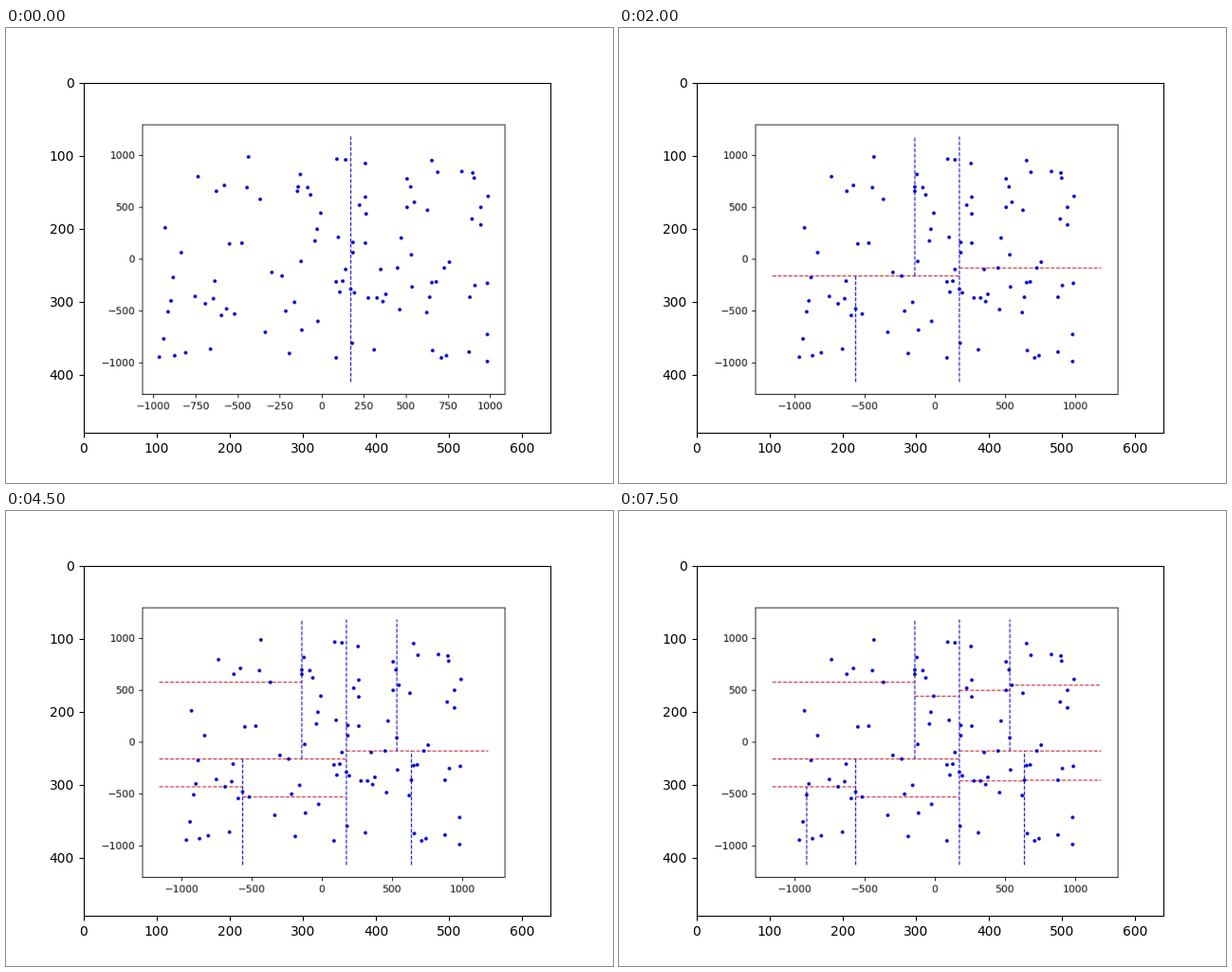
A matplotlib script for the animation above (8000 ms loop, 640 px wide and 480 px high).

```python
import random

import matplotlib.pyplot as plt
import numpy as np
from matplotlib.animation import FuncAnimation

STEP_MS = 500
DOT, VERT, HORZ = "mediumblue", "mediumblue", "#c01c28"

# median points of a k-d tree, breadth first; even levels cut x, odd levels cut y
MEDIANS = [
    (172, -293),
    (-238, -161), (449, -88),
    (-567, -478), (-144, 696), (637, -371), (531, 38),
    (-693, -434), (-519, -533), (-368, 573), (-8, 441),
    (276, -377), (876, -368), (504, 498), (549, 548),
    (-915, -513),
]
EXTREMES = [(-969, -945), (-437, 983), (988, 603), (982, -991)]
LEAVES = range(15, 31)
PER_LEAF = 5

SPAN = [(min(v), max(v)) for v in zip(*EXTREMES)]


def axis_of(i):
    return ((i + 1).bit_length() - 1) % 2


def cell(i, scale=1.0):
    """Box of tree node i as [[x0, x1], [y0, y1]]; scale widens the outer edges."""
    if i == 0:
        return [[scale * lo, scale * hi] for lo, hi in SPAN]
    parent = (i - 1) // 2
    axis = axis_of(parent)
    box = cell(parent, scale)
    box[axis][i % 2] = MEDIANS[parent][axis]
    return box


def make_points():
    rng = random.Random(4)
    points = MEDIANS + EXTREMES
    for leaf in LEAVES:
        box = cell(leaf)
        points += [[rng.uniform(*side) for side in box] for _ in range(PER_LEAF)]
    return points


def add_cut(ax, i):
    axis = axis_of(i)
    value = MEDIANS[i][axis]
    ends = cell(i, 1.2)
    ends[axis] = [value, value]
    ax.plot(*ends, "--", color=HORZ if axis else VERT, lw=1)


def draw_pictures():
    """Plot the tree cut by cut, keeping a picture after each one."""
    ax = fig.add_subplot()
    ax.plot(*zip(*make_points()), ".", color=DOT, ms=5, zorder=3)
    pictures = []
    for i in range(len(MEDIANS)):
        add_cut(ax, i)
        fig.canvas.draw()
        pictures.append(np.array(fig.canvas.buffer_rgba()))
    ax.remove()
    return pictures


fig = plt.figure(figsize=(6.4, 4.8), dpi=100, facecolor="white")
pictures = draw_pictures()
image = fig.add_subplot().imshow(pictures[0])


def update(step):
    image.set_data(pictures[step])
    return [image]


anim = FuncAnimation(fig, update, frames=len(pictures), interval=STEP_MS,
                     repeat=True, repeat_delay=0, blit=False)
plt.show()
```
